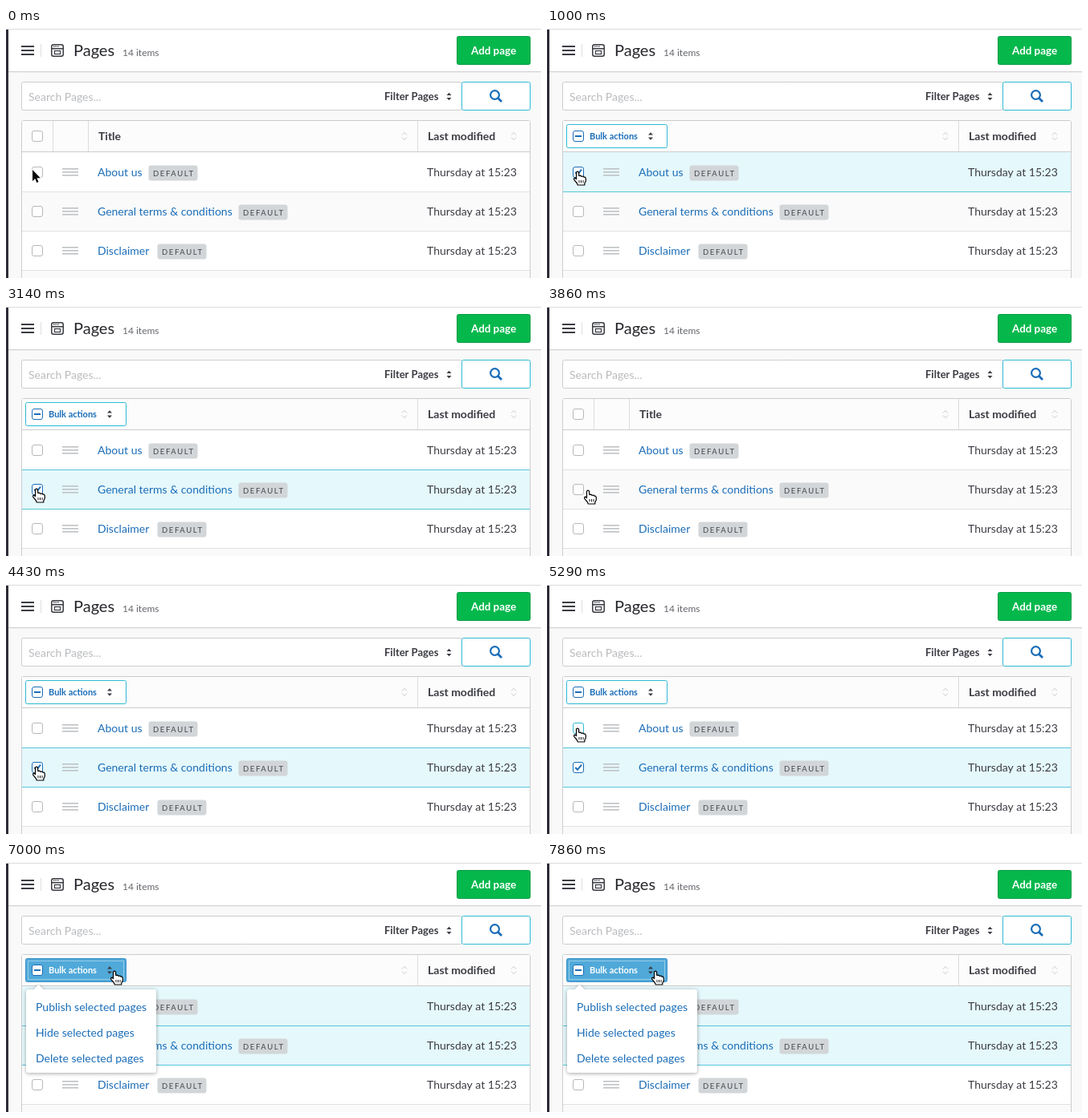
Animation of 666x312 px, one loop 8 s. Source, as an HTML page with a canvas:

```html
<!DOCTYPE html>
<html lang="en">
<head>
<meta charset="utf-8">
<title>Pages</title>
<style>
  html, body { margin: 0; width: 100%; height: 100%; overflow: hidden; background: #fff; }
  canvas { display: block; width: 666px; height: 312px; }
</style>
</head>
<body>
<canvas id="stage" width="666" height="312"></canvas>
<script>
const ctx = document.getElementById('stage').getContext('2d');
const LOOP = 8000, FPS = 7;
const INK = '#3b3c43', BLUE = '#1a6db8', CYAN = '#2fb9d3', LINE = '#cccccc', TINT = '#e5f8fc';

const ROWS = [
  { title: 'About us', y: 180, badge: 177 },
  { title: 'General terms & conditions', y: 229, badge: 289 },
  { title: 'Disclaimer', y: 278, badge: 188 }
];
const MENU = ['Publish selected pages', 'Hide selected pages', 'Delete selected pages'];

// Pointer path: time, x, y
const PATH = [
  [0, 33, 177], [140, 33, 177], [570, 38, 179], [2000, 38, 179], [2430, 38, 228],
  [3430, 38, 228], [3860, 51, 230], [4000, 51, 230], [4290, 38, 228], [4710, 38, 228],
  [5140, 38, 180], [5570, 38, 180], [6000, 129, 132], [6430, 129, 132],
  [6710, 135, 136], [8000, 135, 136]
];

const within = (t, a, b) => t >= a && t < b;

function pointerAt(t) {
  const i = Math.max(1, PATH.findIndex(k => k[0] > t));
  const [t0, x0, y0] = PATH[i - 1], [t1, x1, y1] = PATH[i];
  const p = (t - t0) / (t1 - t0), e = p * p * (3 - 2 * p);
  return { x: x0 + (x1 - x0) * e, y: y0 + (y1 - y0) * e };
}

function rect(x, y, w, h, color) {
  ctx.fillStyle = color;
  ctx.fillRect(x, y, w, h);
}

function box(x, y, w, h, r, fill, stroke) {
  ctx.beginPath();
  ctx.roundRect(x + .5, y + .5, w - 1, h - 1, r);
  ctx.fillStyle = fill;
  ctx.fill();
  if (!stroke) return;
  ctx.strokeStyle = stroke;
  ctx.lineWidth = 1;
  ctx.stroke();
}

function text(str, x, y, size, color, weight = 400, spacing = 0) {
  ctx.font = `${weight} ${size}px Lato, sans-serif`;
  ctx.letterSpacing = spacing + 'px';
  ctx.fillStyle = color;
  ctx.fillText(str, x, y);
}

function path(points, closed) {
  ctx.beginPath();
  points.forEach(([x, y]) => ctx.lineTo(x, y));
  if (closed) ctx.closePath();
}

function stroke(points, color, width) {
  path(points);
  ctx.strokeStyle = color;
  ctx.lineWidth = width;
  ctx.stroke();
}

function sorter(x, y, color, hollow) {
  for (const d of [-1, 1]) {
    const arrow = [[x - 3, y + d * 1.5], [x, y + d * 4.7], [x + 3, y + d * 1.5]];
    if (hollow) stroke(arrow, color, 1);
    else { path(arrow, true); ctx.fillStyle = color; ctx.fill(); }
  }
}

function checkbox(y, { checked, hover, mixed }) {
  box(32, y - 7, 14, 14, 2.5, '#fff', checked || mixed ? BLUE : hover ? CYAN : '#b5b8bb');
  if (mixed) rect(35, y - 1, 8, 2, BLUE);
  if (checked) stroke([[35.3, y], [38, y + 2.8], [43, y - 3.3]], BLUE, 2);
}

function header() {
  rect(0, 0, 666, 312, '#f9f9f9');
  rect(0, 0, 666, 54, '#fff');
  rect(0, 1, 666, 1, '#dcdcdc');
  rect(0, 54, 666, 1, '#d3d3d3');
  rect(0, 55, 666, 1, '#efefef');
  rect(0, 2, 3, 310, '#2d2d38');

  for (const y of [22, 27, 32]) rect(19, y, 16, 2, INK);
  rect(43, 20, 1, 16, '#dedede');
  ctx.strokeStyle = INK;
  ctx.lineWidth = 1.5;
  ctx.beginPath();
  ctx.roundRect(56.75, 20.75, 14.5, 14.5, 2.5);
  ctx.stroke();
  rect(57, 25, 14, 1.5, INK);
  for (const x of [59, 61.5, 64]) rect(x, 22.3, 1.4, 1.4, INK);
  ctx.lineWidth = 1.2;
  ctx.strokeRect(60.5, 28.5, 7, 4);

  text('Pages', 84, 35, 20, '#25262b');
  text('14 items', 145, 35, 12, '#66686e');
  box(561, 10, 92, 36, 2, '#05b84c', '#069c42');
  text('Add page', 579, 33, 13.4, '#fff', 700);
}

function searchBar() {
  box(19, 67, 549, 36, 2, '#fff', LINE);
  text('Search Pages...', 28, 91, 14, '#b9bbbe');
  text('Filter Pages', 471, 90, 13, INK, 700);
  sorter(551.5, 85.5, INK);
  box(567, 67, 86, 36, 2, '#fff', CYAN);
  ctx.strokeStyle = BLUE;
  ctx.lineWidth = 2.2;
  ctx.beginPath();
  ctx.arc(608.5, 83.5, 5.4, 0, 7);
  ctx.stroke();
  stroke([[612.5, 87.5], [617, 92]], BLUE, 2.8);
}

function tableHead(bulk) {
  rect(20, 116, 632, 38, '#fcfcfc');
  rect(512, 116, 1, 38, '#dcdcdc');
  sorter(496, 135, '#c9cbcd', true);
  sorter(632, 135, '#c9cbcd', true);
  text('Last modified', 525, 140, 14, INK, 700);
  if (bulk) return;
  rect(58, 116, 1, 38, '#dcdcdc');
  rect(102, 116, 1, 38, '#dcdcdc');
  checkbox(135, {});
  text('Title', 115, 140, 14, INK, 700);
}

function tableRow(row, i, state) {
  const { title, y, badge } = row;
  const top = i ? y - 24 : 155;
  rect(20, top, 632, y + 24 - top, state.checked ? TINT : i % 2 ? '#fafafa' : '#fff');
  checkbox(y, state);
  for (const d of [-5, -1, 3]) rect(70, y + d, 20, 1.6, '#bfc2c5');
  text(title, 114, y + 5, 14, BLUE);
  box(badge, y - 9, 62, 20, 3, '#d2d6d8');
  text('DEFAULT', badge + 6, y + 5, 9.5, '#45474d', 400, 1.6);
  text('Thursday at 15:23', 524, y + 5, 14, INK);
}

function bulkButton(hover, open) {
  box(24, 120, 126, 30, 2, open ? '#50a9d9' : hover ? TINT : '#fff', open ? '#3b8fc6' : hover ? '#3187c4' : CYAN);
  if (open) {
    ctx.setLineDash([1, 1]);
    ctx.strokeStyle = '#d9eef8';
    ctx.lineWidth = 1;
    ctx.strokeRect(27.5, 123.5, 119, 23);
    ctx.setLineDash([]);
  }
  checkbox(135, { mixed: true });
  text('Bulk actions', 53, 139, 11, open ? '#fff' : BLUE, 700);
  sorter(129, 135, INK);
}

function menu() {
  ctx.save();
  ctx.shadowColor = 'rgba(0,0,0,.35)';
  ctx.shadowBlur = 5;
  ctx.shadowOffsetY = 1;
  ctx.fillStyle = '#fff';
  ctx.beginPath();
  ctx.roundRect(25, 159, 162, 104, 3);
  ctx.moveTo(34, 159.5);
  ctx.lineTo(40.5, 153);
  ctx.lineTo(47, 159.5);
  ctx.fill();
  ctx.restore();
  MENU.forEach((item, i) => text(item, 37, 186 + i * 32, 14, BLUE));
}

function pointer(x, y, hand) {
  ctx.save();
  ctx.translate(Math.round(x), Math.round(y));
  ctx.lineJoin = 'round';
  if (hand) {
    path([[-1.5, 1], [0, 0], [1.5, 1], [1.8, 5.5], [4, 5.2], [5, 6.3], [7, 6], [8, 7.2],
      [9.5, 7.2], [10.3, 8.8], [10.3, 12], [8.8, 15], [8.8, 17], [.3, 17], [-.8, 14.5],
      [-4.3, 10.3], [-4.3, 8.6], [-3, 8], [-1.5, 9.6]], true);
    ctx.fillStyle = '#fff';
    ctx.fill();
    ctx.strokeStyle = '#000';
    ctx.lineWidth = 1.2;
    ctx.stroke();
    for (const k of [2, 4.5, 7]) stroke([[k, 11], [k, 14.3]], '#000', .9);
  } else {
    path([[0, 0], [0, 14], [3.2, 11], [5.3, 16], [7.5, 15], [5.4, 10.3], [9.8, 10.3]], true);
    ctx.strokeStyle = '#fff';
    ctx.lineWidth = 2;
    ctx.stroke();
    ctx.fillStyle = '#000';
    ctx.fill();
  }
  ctx.restore();
}

function draw(t) {
  const { x, y } = pointerAt(t);
  const hand = t >= 400;
  const checked = [
    within(t, 990, 1560) || t >= 5420,
    within(t, 2560, 3420) || t >= 4420,
    false
  ];
  const bulk = checked[0] || checked[1];
  const open = t >= 6850;

  header();
  searchBar();
  box(19, 115, 634, 220, 2, '#fafafa', LINE);
  tableHead(bulk);
  ROWS.forEach((row, i) => {
    const hover = hand && x < 47 && Math.abs(y + 1 - row.y) < 8;
    tableRow(row, i, { checked: checked[i], hover });
  });
  rect(20, 154, 632, 1, LINE);
  ROWS.forEach((row, i) =>
    rect(20, row.y + 24, 632, 1, checked[i] || checked[i + 1] ? '#55c6d9' : '#e1e1e1'));
  if (bulk) bulkButton(x > 24 && y < 150, open);
  if (open) menu();
  pointer(x, y, hand);
}

const start = performance.now();
function tick() {
  const t = (performance.now() - start) % LOOP;
  draw(Math.floor((t + 5) * FPS / 1000) * 1000 / FPS % LOOP);
  requestAnimationFrame(tick);
}
tick();
</script>
</body>
</html>
```
